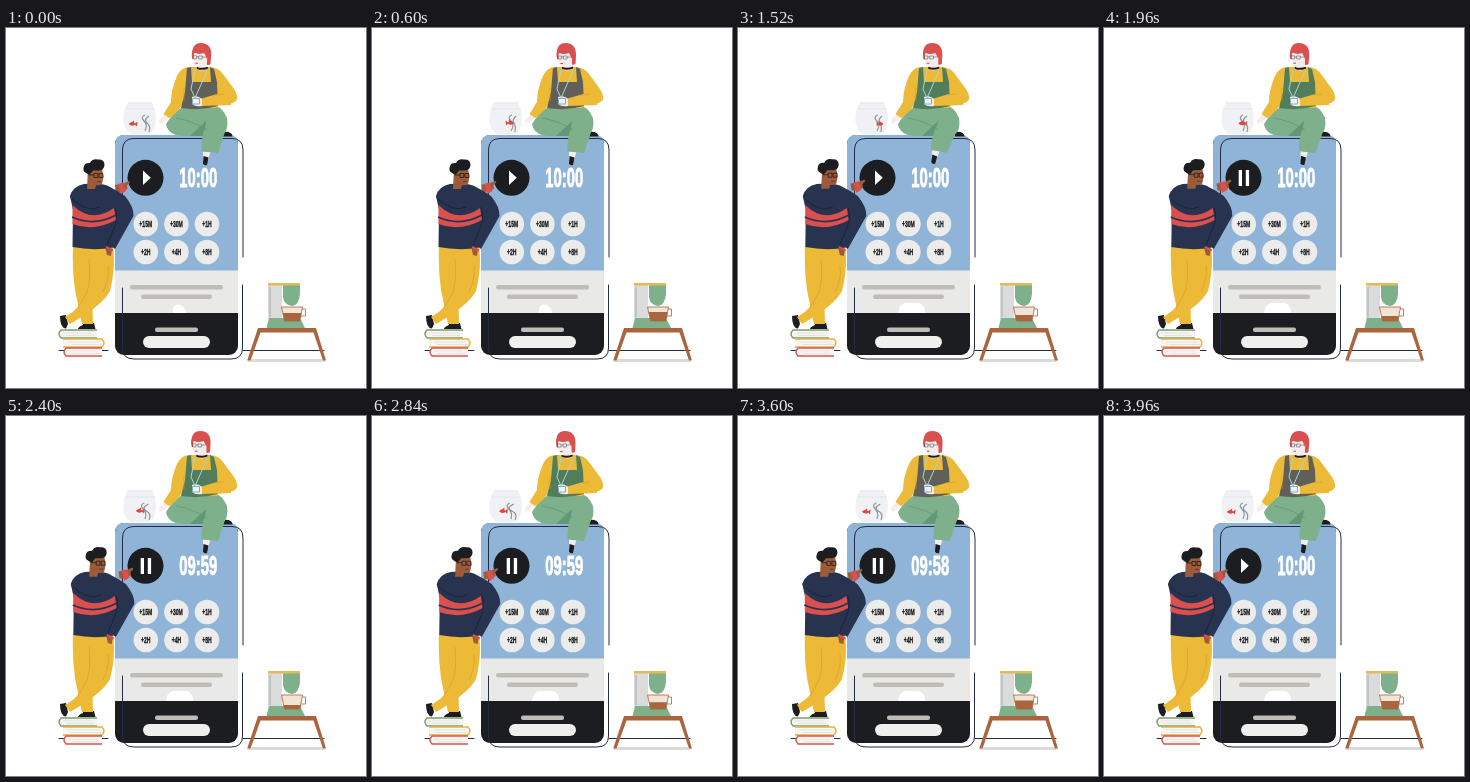
These frames come from a looping animation (360x360 px, 4 s). An HTML page:

```html
<!DOCTYPE html>
<html lang="en">
<head>
<meta charset="utf-8">
<title>Timer</title>
<style>
  html, body { margin: 0; width: 100%; height: 100%; overflow: hidden; background: #fff; }
  svg { display: block; width: 100vw; height: 100vh; }
  text { font-family: "Liberation Sans", Arial, sans-serif; font-weight: 700; text-anchor: middle; paint-order: stroke; }
  .line { fill: none; stroke: #252b42; stroke-width: 1; stroke-linecap: round; }
  .skin { fill: #9c5c3b; }
  .navy { fill: #28334f; }
  .red { fill: #da504e; }
  .yellow { fill: #edba38; }
  .green { fill: #7db08b; }
  .dark { fill: #1b1d20; }
  .pale { fill: #f5eded; }
  .wood { fill: #a9653d; }
  .grey { fill: #c0bdb6; }
  .fold { fill: none; stroke: #d49b25; stroke-width: .6; }
</style>
</head>
<body>
<svg viewBox="0 0 360 360" xmlns="http://www.w3.org/2000/svg">
  <path class="line" d="M53 322.5H102M237 322.5H318" stroke-width=".8"/>

  <g id="phone">
    <rect class="dark" x="109" y="107" width="123" height="220" rx="9"/>
    <path fill="#90b4d7" d="M109 243V116Q109 107 118 107H223Q232 107 232 116V243Z"/>
    <path fill="#e9e9e8" d="M109 242.5H232V285H109Z"/>
    <rect class="grey" x="124" y="257" width="93" height="4.4" rx="2"/>
    <rect class="grey" x="135" y="266.5" width="71" height="4.4" rx="2"/>
    <path id="notch" fill="#fff"/>
    <rect class="grey" x="149" y="299.5" width="43" height="4.4" rx="2"/>
    <rect x="137" y="308" width="67" height="12" rx="6" fill="#efefed"/>
    <circle class="dark" cx="139.5" cy="149.8" r="18"/>
    <path id="play" fill="#fff" d="M137 142.5L144.8 149.8L137 157Z"/>
    <path id="pause" fill="#fff" d="M134.7 142H138V158H134.7ZM141.8 142H145.1V158H141.8Z"/>
    <g id="chips"></g>
    <g transform="translate(192.3 159) scale(.53 1)">
      <text id="clock" font-size="28" fill="#fff" stroke="#fff" stroke-width="1"></text>
    </g>
    <path class="line" d="M116.5 205V122Q116.5 110.5 128 110.5H226Q237 110.5 237 122V229M236.5 257V320Q236.5 331 225 331H128Q116.5 331 116.5 320V260"/>
  </g>

  <g id="books"></g>

  <g id="machine">
    <path d="M245 331H317L319 334H241Z" fill="#dadad8"/>
    <path class="wood" d="M252 300H310L320 332.5H317L307.5 304.5H254.5L244.5 332.5H241.2Z"/>
    <path d="M262 256H276V291H262Z" fill="#dadcdb"/>
    <path d="M264 259V289" stroke="#858b86" stroke-width=".6"/>
    <path class="green" d="M277 257H294V266Q293 277 286 278Q278 277 277 269Z"/>
    <path class="green" d="M260.5 300L263 290H279V292H295L299 300Z"/>
    <path d="M262 255H294V257.5H262Z" fill="#e3ba54"/>
    <path d="M275.5 279H296.5L294 293H278.5Z" fill="#f0e4d6"/>
    <path id="coffee" class="wood"/>
    <path d="M275.5 279H296.5L294 293H278.5ZM296 281H299.5V288H295" fill="none" stroke="#a9653d" stroke-width=".8"/>
  </g>

  <g id="bowl">
    <path d="M122 74.5H146Q152 87 149 97Q147 105.5 142 106H125Q119 103 117.5 94Q116.5 83 122 74.5Z" fill="#f0f1f5"/>
    <path d="M122 75H146M119.5 81H149" fill="none" stroke="#dee1e9" stroke-width=".8"/>
    <path id="weed" fill="none" stroke="#8b9798" stroke-width="1.2"/>
    <g id="fish">
      <path fill="#dd493f" d="M-4.3 0Q-1-3.5 2 -.5L4.5-2.6L4 2.6L2 .8Q-1 3-4.3 0Z"/>
      <path fill="#dd493f" d="M-1.5-1.4L1-3.6L1.2-.6Z"/>
    </g>
  </g>

  <g id="woman">
    <path class="dark" d="M217 104Q226 103 226.5 108.5H217Z"/>
    <path class="green" d="M178 78Q167 84 160 96Q162 107 176 108H214Q223 105 221 90Q216 78 205 76Z"/>
    <path fill="#649776" d="M184 108L200 93L198 108Z"/>
    <g id="leg">
      <path class="pale" d="M197 122H205L202 132H197Z"/>
      <path class="dark" d="M197.5 128L202.5 129.5L201 137Q198 138 197 135.5Z"/>
      <path class="green" d="M216 83Q224 92 219 104L212 125L195.5 123.5Q195 110 199 100Q203 87 216 83Z"/>
    </g>
    <path d="M170 90Q187 93 201 102" fill="none" stroke="#5d9570" stroke-width=".7"/>
    <path class="pale" d="M161 84L166 87L158 94L153.5 96L153 92Z"/>
    <path class="yellow" d="M184 39Q175 39 171 48Q165 62 165 74L157.5 86L163 90Q174 83 178 73L178 80H211L212 77Q224 78 230 73Q233 69 228 61L217 46Q212 39 203 39Z"/>
    <path id="bib" d="M181 40L185 39L186 54H205L204 39L208 41L211 54L212 78Q195 83 175 80L179 64Z"/>
    <path class="yellow" d="M194 71L211 66L225 68L225 77L195 78Z"/>
    <path class="fold" d="M209 67L218 66M178 60V73"/>
    <path class="pale" d="M186 69Q192 67 196 71V78Q189 79 186 76Z"/>
    <path d="M189 42L185 61L189 70L201 43" fill="none" stroke="#a4d6d5" stroke-width="1"/>
    <path d="M186.5 70.5H193.5V76H186.5Z" fill="#edf4f8" stroke="#6d98b5" stroke-width=".8"/>
    <g id="face">
      <path class="red" d="M185 31Q183 15 193.5 15Q204 15 204 27L203.5 36Q200 38 197 35Z"/>
      <path class="pale" d="M186.5 25H198L200 29V41Q195 44 191 41V38.5Q187 38 186.5 34Z"/>
      <path class="red" d="M184.5 29Q184 18 193 16Q201 17 200 31L197 25Q191 27 187.5 25Z"/>
      <path class="dark" d="M190 38.8Q195 41 201 38.5V40.4Q195 43 190 40.8Z"/>
      <path d="M186 28H189.5V31H186ZM191.5 28H195V31H191.5ZM189.5 29H191.5M195 29H199" fill="none" stroke="#444" stroke-width=".5"/>
      <path d="M188.5 35.4H191" stroke="#d33e4a" stroke-width="1"/>
    </g>
  </g>

  <g id="man">
    <path class="dark" d="M54 288L60 287L62 296L60 300.5Q54 300 54 288ZM77 295H88L89.5 301H72Q72 299 77 297Z"/>
    <path class="yellow" d="M67 218H88L86 260L87 296H76L69 262Q66 240 67 218Z"/>
    <path class="yellow" d="M80 218H107Q110 240 104 263Q97 277 64 296L59 289Q75 281 82 262Z"/>
    <path class="fold" d="M83 231Q85 252 81 264L72 280M102 238Q104 250 97 264"/>
    <g id="hand">
      <path class="skin" d="M109 157L117 155.5L123 153L124 154.5L121 157.5L121.5 161L116 164L110 164Z"/>
      <path class="red" d="M112 156L117 154.8L120 163L115 166.5Z"/>
    </g>
    <g id="torso">
      <path class="skin" d="M99 218L106 221L105 228L101 227Z"/>
      <path class="navy" d="M64 168Q67 158 78 156Q97 154 104 159Q112 163 119 168Q128 179 127.5 188L109 221L107 219.5Q88 223 66.5 219L67 182Z"/>
      <path class="red" d="M66.5 177Q86 196 108 180L110 192Q88 204 66.5 196Z"/>
      <path d="M66 189Q88 199 110 187" fill="none" stroke="#28334f" stroke-width="1.7"/>
      <path class="navy" d="M64 168Q70 159 84 159Q95 165 96 179Q87 189 65 171Z"/>
      <path d="M100 219L107 222.5" stroke="#da504e" stroke-width="2"/>
      <path d="M109 179Q113 190 107 203L101 217M66 171Q82 185 94 179" fill="none" stroke="#172039" stroke-width=".8"/>
    </g>
    <g id="head">
      <path class="skin" d="M82 140H96L97.5 149L96 156Q93 158 90 157L89 161H81Z"/>
      <path class="dark" d="M80 145Q76 143 78 138Q79 134.5 84 135Q86 130.5 92 131.5Q98.5 131 98.5 137Q98 142 93 142.5L87 142.5L83.5 147Z"/>
      <path d="M83 147H88M88 145.5H91.8V149.5H88ZM93 145.5H96.8V149.5H93Z" fill="none" stroke="#25191b" stroke-width=".8"/>
      <path d="M91 153.5H95" stroke="#64352a" stroke-width="1"/>
    </g>
  </g>
</svg>
<script>
const LOOP = 4000;
const $ = id => document.getElementById(id);

$('chips').innerHTML = ['+15M', '+30M', '+1H', '+2H', '+4H', '+8H'].map((label, i) => {
  const x = 139.8 + i % 3 * 30.6, y = 196 + (i > 2) * 28;
  return `<circle cx="${x}" cy="${y}" r="12.3" fill="#ececea"/>
    <g transform="translate(${x} ${y + 3}) scale(.58 1)">
      <text font-size="8.8" fill="#1b1d20" stroke="#1b1d20" stroke-width=".35">${label}</text></g>`;
}).join('');

$('books').innerHTML = [[52, 91, '#7e9d70'], [57, 99, '#e3b43c'], [57, 96, '#d4574d']].map(([a, b, color], i) => {
  const y = 302 + i * 9;
  const cover = i === 1
    ? `M${a} ${y}H${b - 3}Q${b + 1} ${y + 4} ${b - 3} ${y + 8}H${a}`
    : `M${b} ${y}H${a + 3}Q${a - 1} ${y + 4} ${a + 3} ${y + 8}H${b}`;
  return `<path d="${cover}" fill="#f6f5f4" stroke="${color}" stroke-width="1.4"/>
    <path d="M${a + 5} ${y + 3}H${b - 5}M${a + 8} ${y + 5.5}H${b - 3}" stroke="#d9d9d9" stroke-width=".6"/>`;
}).join('');

// Eased value between [time, value] stops
function key(t, stops) {
  const i = stops.findIndex(s => s[0] > t);
  if (i < 0) return stops[stops.length - 1][1];
  const [t0, a] = stops[i - 1], [t1, b] = stops[i];
  const u = (t - t0) / (t1 - t0);
  return a + (b - a) * u * u * (3 - 2 * u);
}

const move = (id, value) => $(id).setAttribute('transform', value);
const show = (id, on) => $(id).setAttribute('visibility', on ? 'visible' : 'hidden');

function draw(t) {
  const wave = Math.sin(t / LOOP * Math.PI * 2);
  const nod = (1 - Math.cos(t / LOOP * Math.PI * 4)) / 2;

  const running = t >= 1680 && t < 3840;
  show('play', !running);
  show('pause', running);
  $('clock').textContent = t < 2000 || !running ? '10:00' : t < 3000 ? '09:59' : '09:58';
  $('notch').setAttribute('d', t < 640
    ? 'M167 285V280Q170 275 175 277Q180 280 180 285Z'
    : 'M160 285L161 280Q164 275 168 275H180Q185 275 187 282V285Z');

  const x = key(t, [[0, 127], [600, 138], [1300, 142], [1600, 142], [2400, 134], [3240, 129], [4000, 127]]);
  const y = key(t, [[0, 96], [600, 95], [1500, 96], [2400, 95], [4000, 96]]);
  const turn = key(t, [[0, 1], [260, -1], [1450, -1], [1800, 1], [4000, 1]]);
  move('fish', `translate(${x} ${y}) scale(${turn} 1)`);
  const sway = wave * 1.2;
  $('weed').setAttribute('d', `M139 103Q${142 + sway} 97 ${138 + sway} 93T${139 + sway} 87M143 104Q${145 - sway} 98 ${141 + sway} 95T${143 + sway} 88`);

  const kick = key(t, [[0, 0], [1080, 0], [1520, 1], [2100, 0], [4000, 0]]);
  move('leg', `rotate(${kick * 5} 212 92)`);
  move('face', `translate(${.8 - nod * 1.2} 0) rotate(${2 - nod * 3} 194 40)`);
  $('bib').setAttribute('fill', t >= 1160 && t < 3400 ? '#527d5d' : '#605f59');

  const lean = key(t, [[0, 0], [600, 0], [1520, 1], [2600, 1], [3240, .8], [4000, 0]]);
  move('head', `translate(${lean * 2.2} ${lean * -.3})`);
  move('torso', `translate(${lean * .8} 0)`);
  const reach = key(t, [[0, 0], [1000, .2], [1520, 1], [2400, 1], [3240, .3], [4000, 0]]);
  move('hand', `translate(${reach * 3.5} ${reach * -1.5})`);

  const level = key(t, [[0, 285], [600, 284], [1000, 285], [1520, 287], [2400, 289], [3240, 284], [4000, 285]]);
  const inset = (level - 279) * .2;
  $('coffee').setAttribute('d', `M${275.5 + inset} ${level}H${296.5 - inset}L294 293H278.5Z`);
}

const start = performance.now();
function tick(now) {
  draw(Math.max(0, now - start) % LOOP);
  requestAnimationFrame(tick);
}
draw(0);
requestAnimationFrame(tick);
</script>
</body>
</html>
```
